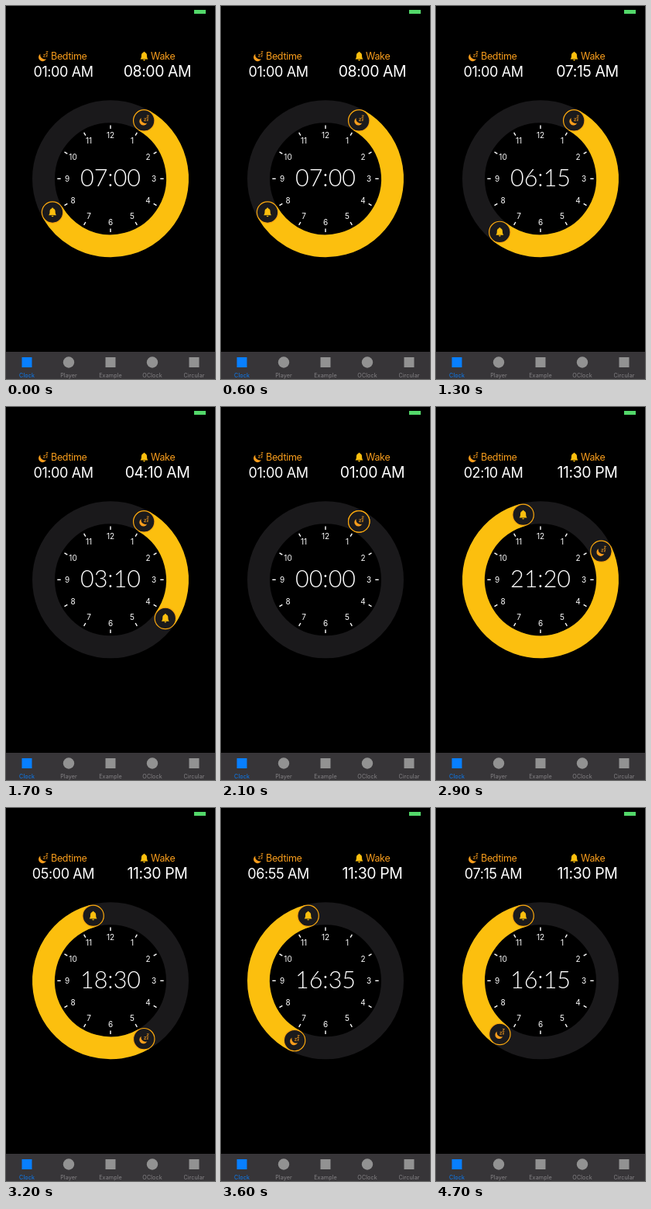
Animation, 270 px wide and 480 px high, one loop 5.1 s. Source, as an HTML page:

```html
<!DOCTYPE html>
<html lang="en">
<head>
<meta charset="utf-8">
<title>Sleep clock</title>
<style>
html, body { margin: 0; height: 100%; overflow: hidden; background: #000; }
svg { display: block; width: 100vw; height: 100vh; font-family: Inter, Roboto, sans-serif; }
text { fill: #fff; text-anchor: middle; }
.label { font-size: 12.5px; letter-spacing: -.3px; text-anchor: start; fill: #f89d1c; }
.hour { font-size: 10px; }
#span { font: 300 30.5px Lato, sans-serif; }
#bedTime { font-size: 18px; letter-spacing: -.4px; }
#wakeTime { font-size: 19.5px; letter-spacing: -.45px; }
.tab { fill: #929292; }
.tab text { font-size: 7.2px; letter-spacing: .1px; fill: #858386; }
.tab.on, .tab.on text { fill: #087ffe; }
.knob { fill: #1b1a1c; stroke: #fba80e; stroke-width: 1.2; }
</style>
</head>
<body>
<svg viewBox="0 0 270 480">
  <defs>
    <g id="moon">
      <path fill="#f89d1c" d="M-3.5-3.5A5.2 5.2 0 1 0 4 3A5.5 5.5 0 0 1-3.5-3.5Z"/>
      <path fill="none" stroke="#f89d1c" stroke-width=".75" d="M.2-2.6h2.5l-2.5 2.9h2.5M3.8-1.8h1.7l-1.7 2h1.7M3.6-6.4h2.5l-2.5 2.8h2.5"/>
    </g>
    <path id="bell" fill="#fcbf0e" d="M0-6a1 1 0 0 1 1 1C3.2-4.3 3.6-2.6 3.6-.5C3.6 1.8 4.2 2.6 5 3.8H-5C-4.2 2.6-3.6 1.8-3.6-.5C-3.6-2.6-3.2-4.3-1-5A1 1 0 0 1 0-6ZM-1.3 4.4H1.3A1.3 1.3 0 0 1-1.3 4.4Z"/>
  </defs>
  <rect width="270" height="480"/>
  <rect x="243" y="5" width="15" height="5" fill="#53d86a"/>

  <use href="#moon" x="48" y="65"/>
  <text class="label" x="58" y="69">Bedtime</text>
  <text id="bedTime" x="74" y="91"/>
  <use href="#bell" x="178.5" y="64.7"/>
  <text class="label" x="187" y="69">Wake</text>
  <text id="wakeTime" x="195.5" y="91"/>

  <g transform="translate(135 222.3)">
    <g fill="none" stroke-width="29">
      <circle r="86.5" stroke="#1a191b"/>
      <circle id="arc" r="86.5" stroke="#fcbf0e" pathLength="720"/>
    </g>
    <g id="face"></g>
    <text id="span" y="10"/>
    <g id="wake"><circle class="knob" r="13.7"/><use href="#bell"/></g>
    <g id="bed"><circle class="knob" r="13.7"/><use href="#moon"/></g>
  </g>

  <rect y="445" width="270" height="35" fill="#373538"/>
  <g id="tabs"></g>
</svg>
<script>
const $ = id => document.getElementById(id);
const LOOP = 5100, STEP = 100, HALF_DAY = 720, DAY = 1440;

// [ms, minutes after midnight]
const wakeKeys = [[1200, 480], [1300, 435], [2100, 60], [2400, -10], [2600, -30]];
const bedKeys = [[2700, 60], [2800, 85], [2900, 130], [3200, 300], [3400, 370],
  [3600, 415], [3900, 430], [4200, 440], [4400, 440], [4700, 435]];

const mod = (n, m) => (n % m + m) % m;
const pad = n => String(n).padStart(2, '0');
const hhmm = (h, m) => pad(h) + ':' + pad(mod(m, 60));

function minutesAt(keys, t) {
  const next = keys.findIndex(k => k[0] >= t);
  if (next === 0) return keys[0][1];
  if (next < 0) return keys[keys.length - 1][1];
  const [t0, a] = keys[next - 1], [t1, b] = keys[next];
  return Math.round((a + (b - a) * (t - t0) / (t1 - t0)) / 5) * 5;
}

function clockText(min) {
  const m = mod(min, DAY);
  return hhmm(Math.floor(m / 60) % 12 || 12, m) + (m < HALF_DAY ? ' AM' : ' PM');
}

function polar(min, r) {
  const a = min / HALF_DAY * 2 * Math.PI;
  return [r * Math.sin(a), -r * Math.cos(a)];
}

function buildFace() {
  let out = '';
  for (let h = 1; h <= 12; h++) {
    const [x, y] = polar(h * 60, 56);
    out += `<path d="M0-68.7v4.4" stroke="#fff" stroke-width="1.4" transform="rotate(${h * 30})"/>
      <text class="hour" x="${x}" y="${y + 3.6}">${h}</text>`;
  }
  $('face').innerHTML = out;
}

function buildTabs() {
  $('tabs').innerHTML = ['Clock', 'Player', 'Example', 'OClock', 'Circular'].map((name, i) =>
    `<g class="tab${i ? '' : ' on'}" transform="translate(${27 + 54 * i} 458.5)">
      <rect x="${i % 2 ? -7.2 : -6.5}" y="${i % 2 ? -7.2 : -6.5}" width="${i % 2 ? 14.4 : 13}"
        height="${i % 2 ? 14.4 : 13}" rx="${i % 2 ? 7.2 : 0}"/>
      <text y="19">${name}</text></g>`).join('');
}

function draw(now) {
  const t = Math.floor(now % LOOP / STEP) * STEP;
  const bed = minutesAt(bedKeys, t), wake = minutesAt(wakeKeys, t);
  const span = mod(wake - bed, DAY);
  $('bedTime').textContent = clockText(bed);
  $('wakeTime').textContent = clockText(wake);
  $('span').textContent = hhmm(Math.floor(span / 60), span);
  $('arc').setAttribute('stroke-dasharray', `${span % HALF_DAY} ${HALF_DAY}`);
  $('arc').setAttribute('transform', `rotate(${bed / 2 - 90})`);
  $('bed').setAttribute('transform', `translate(${polar(bed, 86.5)})`);
  $('wake').setAttribute('transform', `translate(${polar(wake, 86.5)})`);
}

buildFace();
buildTabs();
const start = performance.now();
function tick() {
  draw(performance.now() - start);
  requestAnimationFrame(tick);
}
tick();
</script>
</body>
</html>
```
